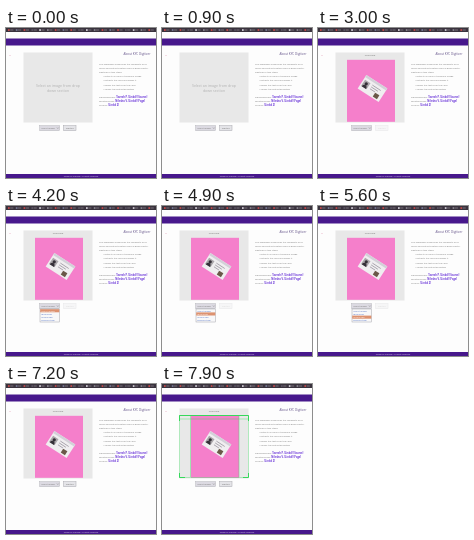
An HTML page for the animation above (8000 ms loop, 150 px wide and 150 px high).

```html
<!DOCTYPE html>
<html lang="en">
<head>
<meta charset="utf-8">
<title>Document digitizer</title>
<style>
  html, body { margin: 0; width: 100%; height: 100%; overflow: hidden; background: #fff; }
  svg { display: block; width: 100vw; height: 100vh; }
  text { font: 2.35px "Open Sans", sans-serif; fill: #777; }
  .soft { filter: blur(.3px); }
  .title { font-size: 3px; fill: #65548a; }
  .prompt { font-size: 3.6px; fill: #b0b0b0; }
  .row { font-size: 2.5px; }
  .link { font-weight: bold; fill: #6a35d8; }
  .mid { text-anchor: middle; }
  .light { fill: #ddd2ee; }
</style>
</head>
<body>
<svg viewBox="0 0 150 150">
  <rect width="150" height="150" fill="#fdfdfd"/>
  <rect y="10.5" width="150" height="7" fill="#47188c"/>
  <rect width="150" height="4" fill="#3a333e"/>
  <g id="tabs"></g>
  <rect y="146" width="150" height="4" fill="#47188c"/>
  <text class="mid light" x="75" y="149" style="font-size:2px">Made for learning. All rights reserved</text>

  <g class="soft">
    <circle cx="4" cy="27.5" r=".6" fill="#e9b5c8"/>
    <rect x="17.5" y="24.5" width="69" height="70" fill="#e8e8e8"/>
    <g id="prompt">
      <text class="mid prompt" x="52" y="58.5">Select an image from drop</text>
      <text class="mid prompt" x="52" y="64">down section</text>
    </g>

    <g id="preview">
      <text class="mid" x="52" y="28.2">idcard.jpg</text>
      <rect x="29" y="31.8" width="48" height="62" fill="#f57fcb"/>
      <g transform="translate(54.5 60.5) rotate(33)">
        <rect x="-12.5" y="-8" width="25" height="16" fill="#f0eef0"/>
        <rect x="-12.5" y="-8" width="25" height="2.4" fill="#d3d0d8"/>
        <rect x="-11" y="-3.4" width="6.4" height="7.4" fill="#aaa6aa"/>
        <path d="M-10.4 4q.2-3 2.6-3t2.6 3z" fill="#353038"/>
        <circle cx="-7.8" cy="-.5" r="1.6" fill="#353038"/>
        <path d="M-2-2.8H8M-2-.6H6M-2 1.6H4" stroke="#96919b" stroke-width=".7"/>
        <rect x="4.5" y="2" width="5" height="4.5" fill="#6a5848"/>
      </g>
    </g>

    <g id="outline" fill="none" stroke="#36d85b">
      <rect x="17.5" y="31.5" width="69" height="62" stroke-width=".35"/>
      <path d="M17.5 37V31.5H86.5V37M17.5 89V93.5H23M81 93.5H86.5V89" stroke-width="1"/>
      <path d="M28.5 32V93M77 32V93M17.5 35H86.5" stroke-width=".4"/>
    </g>

    <rect x="33.7" y="97.7" width="19.8" height="5" fill="#dcdae2" stroke="#b4b4ba" stroke-width=".5"/>
    <text x="35.2" y="101.1">Select Image</text>
    <path d="M51 99.6l.8.9.8-.9" fill="none" stroke="#666" stroke-width=".4"/>
    <g id="submit">
      <rect x="57.5" y="97.7" width="12.5" height="5" fill="#e4e4e8" stroke="#a8a8ae" stroke-width=".5"/>
      <text class="mid" x="63.8" y="101.1">Digitize</text>
    </g>

    <g id="menu">
      <rect x="34" y="103" width="19.5" height="13" fill="#f8f8f9" stroke="#a5a5ac" stroke-width=".5"/>
      <rect id="hover" x="34.2" width="19.1" height="3.1" fill="#dd9270"/>
      <g id="options"></g>
    </g>

    <text class="mid title" x="131" y="26.5">About KYC Digitizer</text>
    <g id="copy"></g>
  </g>
</svg>
<script>
const $ = id => document.getElementById(id);
const svgNode = (parent, tag, attrs, text = "") => {
  const node = document.createElementNS("http://www.w3.org/2000/svg", tag);
  for (const key in attrs) node.setAttribute(key, attrs[key]);
  node.textContent = text;
  return parent.appendChild(node);
};

const tabColors = ["#c94a4a", "#8b8790", "#d5d1d9", "#5c5664", "#c94a4a", "#777a96"];
for (let i = 0; i < 19; i++) {
  svgNode($("tabs"), "rect", { x: 2 + i * 7.8, y: 1.2, width: 1.7, height: 1.7, fill: tabColors[i * 5 % 6] });
  svgNode($("tabs"), "rect", { x: 4.2 + i * 7.8, y: 1.6, width: 3.2, height: .8, fill: "#847e88" });
}

[
  ["This webpage showcases the capability of ID"],
  ["cards and extracts details from a given photo."],
  ["Digitizer in two steps:"],
  ["•  Detects ID card in the given image", 4],
  ["•  Extracts the card and aligns it", 4],
  ["•  Reads the text from the card", 4],
  ["•  Shows the extracted details", 4]
].forEach(([line, indent = 0], i) =>
  svgNode($("copy"), "text", { x: 93 + indent, y: 36.6 + i * 4.2 }, line));

[
  ["Developed By: ", "Tavesh P. [Linkd] [Source]"],
  ["Mentored By: ", "Nilesha V. [Linkd] [Page]"],
  ["Source: ", "[Linkd 2]"]
].forEach(([label, link], i) => {
  const row = svgNode($("copy"), "text", { class: "row", x: 93, y: 70.2 + i * 4 }, label);
  svgNode(row, "tspan", { class: "link" }, link);
});

const options = ["Select Image", "idcard.jpg", "license.jpg", "passport.jpg"]
  .map((name, i) => svgNode($("options"), "text", { x: 35.2, y: 105.5 + i * 3.2 }, name));

const show = (id, visible) => $(id).style.display = visible ? "" : "none";
const hoverSteps = [[4500, 1], [5400, 2]];

function draw(now) {
  const t = now % 8000;
  show("prompt", t < 2400);
  show("preview", t >= 2400);
  show("menu", t >= 3400 && t < 6600);
  show("outline", t >= 7800);
  $("submit").style.opacity = t < 2400 || t >= 6600 ? 1 : .25;
  const active = hoverSteps.reduce((row, [start, next]) => t >= start ? next : row, 0);
  $("hover").setAttribute("y", 103.2 + active * 3.2);
  options.forEach((option, i) => option.style.fill = i === active ? "#fff" : "#5573c4");
  requestAnimationFrame(draw);
}
requestAnimationFrame(draw);
</script>
</body>
</html>
```
